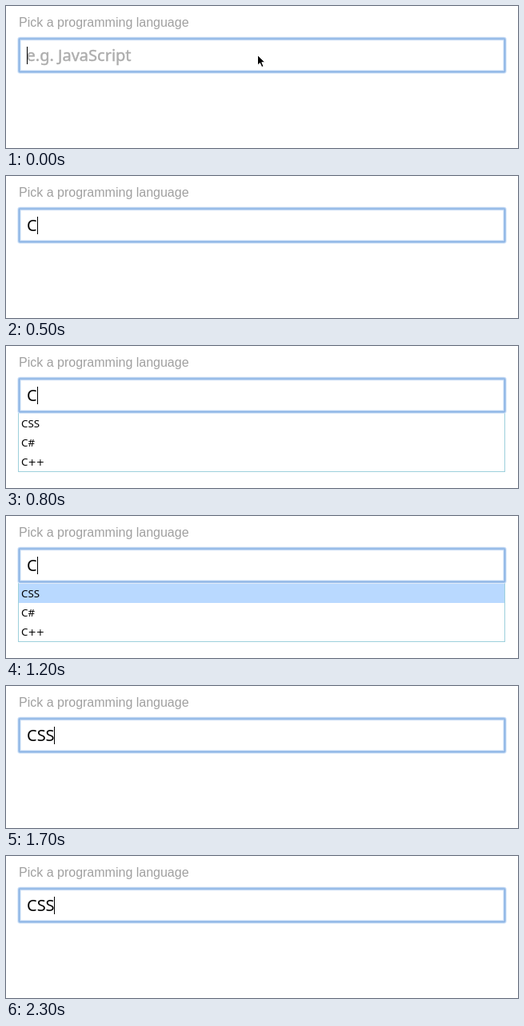
These frames come from a looping animation (640x178 px, 2.4 s). An HTML page:

```html
<!DOCTYPE html>
<html lang="en">
<head>
<meta charset="utf-8">
<title>Autocomplete field</title>
<style>
html, body { margin: 0; width: 100%; height: 100%; overflow: hidden; background: #fff; }
svg { display: block; width: 640px; height: 178px; }

.label { font: 16px "Liberation Sans", Arial, sans-serif; fill: #a0a0a0; }
.value { font: 20px "Noto Sans", "Open Sans", sans-serif; }
.hint { fill: #adadad; stroke: #adadad; stroke-width: .45px; }
.item { font: 13.33px "Noto Sans", "Open Sans", sans-serif; }
.plus { font: 12.3px "DejaVu Sans", sans-serif; }

.ring rect { fill: none; }
.halo { stroke: #d3e4f8; stroke-width: 4.4; }
.glow { stroke: #a9c8ee; stroke-width: 2.8; }
.core { stroke: #8bb3e3; stroke-width: 1.2; }
.list { fill: #fff; stroke: #9dd0dc; }
.picked { fill: #b9d9ff; }

.empty, .typed, .done, .menu, .picked, .caret { animation: 2400ms step-end infinite; }
.empty { animation-name: empty; }
.typed { animation-name: typed; }
.done { animation-name: done; }
.menu { animation-name: menu; }
.picked { animation-name: picked; }
.caret { animation-name: blink; }

@keyframes empty { 0% { opacity: 1 } 20.8333%, 100% { opacity: 0 } }
@keyframes typed { 0% { opacity: 0 } 20.8333% { opacity: 1 } 70.8333%, 100% { opacity: 0 } }
@keyframes done { 0% { opacity: 0 } 70.8333%, 100% { opacity: 1 } }
@keyframes menu { 0% { opacity: 0 } 25% { opacity: 1 } 70.8333%, 100% { opacity: 0 } }
@keyframes picked { 0% { opacity: 0 } 50% { opacity: 1 } 70.8333%, 100% { opacity: 0 } }
@keyframes blink {
  0% { opacity: 1 } 12.5% { opacity: 0 }
  20.8333% { opacity: 1 } 54.1666% { opacity: 0 }
  70.8333%, 100% { opacity: 1 }
}
</style>
</head>
<body>
<svg viewBox="0 0 640 178">
  <text class="label" x="16" y="26">Pick a programming language</text>

  <g class="menu">
    <rect class="list" x="15.5" y="83.5" width="608" height="74"/>
    <rect class="picked" x="16" y="85" width="607" height="24"/>
    <g class="item">
      <text x="19" y="102">CSS</text>
      <text x="19" y="126">C#</text>
      <text x="19" y="150">C<tspan class="plus">++</tspan></text>
    </g>
  </g>

  <g class="ring">
    <rect class="halo" x="16.5" y="41" width="607" height="41.5" rx="1"/>
    <rect class="glow" x="16.5" y="41" width="607" height="41.5" rx="1"/>
    <rect class="core" x="16.5" y="41" width="607" height="41.5" rx="1"/>
  </g>

  <g class="value">
    <g class="empty">
      <text class="hint" x="25.5" y="69">e.g. JavaScript</text>
      <rect class="caret" x="26" y="51" width="1" height="22"/>
      <path d="M314.5 61.5V74.2L317.4 71.5L319.7 76.6L322 75.6L319.8 70.7H323.8Z" stroke="#fff" stroke-width="1"/>
    </g>
    <g class="typed">
      <text x="26" y="69">C</text>
      <rect class="caret" x="39" y="51" width="1" height="22"/>
    </g>
    <g class="done">
      <text x="26" y="69">CSS</text>
      <rect class="caret" x="60" y="51" width="1" height="22"/>
    </g>
  </g>
</svg>
</body>
</html>
```
